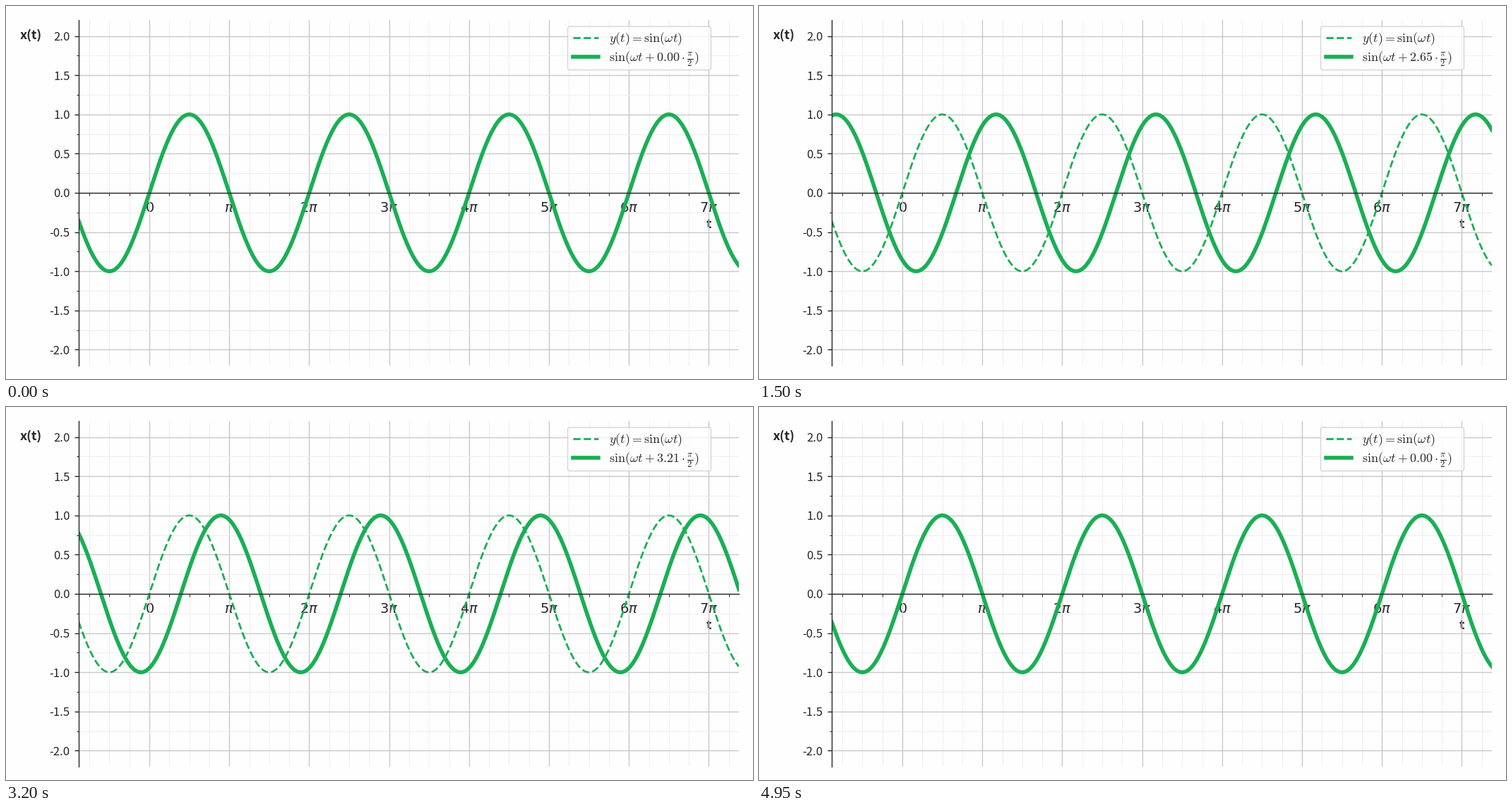
A matplotlib script for the animation above (5 s loop, 1058 by 529 pixels).

```python
import numpy as np
import matplotlib.pyplot as plt
from matplotlib.animation import FuncAnimation
from matplotlib.lines import Line2D
from matplotlib.patches import FancyBboxPatch
from matplotlib.ticker import MultipleLocator

W, H, DPI = 1058, 529, 72  # at 72 dpi one point is one pixel
FRAMES, INTERVAL = 100, 50
LEFT, RIGHT, TOP, BOTTOM = 103, 1038, 20.3, 509.7
X0, PX_PER_PI = 203, 113.2
BG, GREEN, DARK = "#fefefe", "#1aaf54", "#262626"
THIN, THICK = 2.78, 5.56

plt.rcParams["font.family"] = ["Noto Sans CJK JP", "DejaVu Sans"]
plt.rcParams["mathtext.fontset"] = "dejavusans"
plt.rcParams["axes.unicode_minus"] = False

fig = plt.figure(figsize=(W / DPI, H / DPI), dpi=DPI, facecolor=BG)
ax = fig.add_axes([LEFT / W, 1 - BOTTOM / H, (RIGHT - LEFT) / W, (BOTTOM - TOP) / H],
                  facecolor=BG)


def to_t(px):
    return (px - X0) / PX_PER_PI * np.pi


def to_px(x, y):
    """Stage pixels, y down, to display coordinates."""
    return x, H - y


def label(x, y, s, size, **kw):
    kw = {"ha": "center", "zorder": 1.5, "color": DARK} | kw
    return ax.text(*to_px(x, y), s, fontsize=size, va="baseline",
                   transform=None, **kw)


def setup_axes():
    ax.set_xlim(to_t(LEFT), to_t(RIGHT))
    ax.set_ylim(-2.2, 2.2)
    ax.xaxis.set_major_locator(MultipleLocator(np.pi))
    ax.xaxis.set_minor_locator(MultipleLocator(np.pi / 4))
    ax.yaxis.set_major_locator(MultipleLocator(0.5))
    ax.yaxis.set_minor_locator(MultipleLocator(0.25))
    ax.yaxis.set_major_formatter(lambda v, _: f"{v:.1f}")
    ax.grid(which="major", color="#c8c8c8", linewidth=1.4)
    ax.grid(which="minor", color="#eeeeee", linewidth=1)
    ax.tick_params(which="major", length=6, width=1.4, color=DARK,
                   labelcolor=DARK, labelsize=16.67, pad=6.3)
    ax.tick_params(which="minor", length=3.5, width=1, color=DARK)
    ax.tick_params(axis="x", labelbottom=False)
    ax.spines[["top", "right"]].set_visible(False)
    ax.spines["bottom"].set_position("zero")
    for side in ("left", "bottom"):
        ax.spines[side].set(color=DARK, linewidth=1.4)

    for k in range(8):
        text = "0" if k == 0 else rf"{k if k > 1 else ''}\pi"
        label(X0 + k * PX_PER_PI, 292, f"${text}$", 19.44)
    label(35, 47, "x(t)", 18, weight="bold")
    label(995.5, 315, "t", 18, weight="bold")


def setup_legend():
    ax.add_artist(FancyBboxPatch(
        to_px(795.5, 90.7), 203, 61.7, boxstyle="round,pad=0,rounding_size=3.6",
        transform=None, facecolor=BG, edgecolor="#cccccc", linewidth=1.39,
        alpha=0.8, zorder=5, clip_on=False))
    for y, style, lw in ((44.5, "--", THIN), (71.5, "-", THICK)):
        ax.add_artist(Line2D([803, 839.2], [H - y] * 2, color=GREEN, ls=style,
                             lw=lw, transform=None, zorder=6))
    kw = dict(ha="left", zorder=6, math_fontfamily="cm")
    label(853.5, 51, r"$y(t) = \sin(\omega t)$", 18.06, **kw)
    return label(853.5, 78, "", 18.06, **kw)


setup_axes()
formula = setup_legend()
t = np.linspace(to_t(LEFT), to_t(RIGHT), 1000)
ax.plot(t, np.sin(t), "--", color=GREEN, lw=THIN)
wave, = ax.plot(t, np.sin(t), color=GREEN, lw=THICK)


def update(i):
    # phase in quarter turns swings 0 -> 4 -> 0
    shift = 2 - 2 * np.cos(2 * np.pi * i / (FRAMES - 1))
    wave.set_ydata(np.sin(t + shift * np.pi / 2))
    formula.set_text(rf"$\sin(\omega t + {shift:.2f} \cdot \frac{{\pi}}{{2}})$")
    return wave, formula


anim = FuncAnimation(fig, update, frames=FRAMES, interval=INTERVAL,
                     repeat=True, repeat_delay=0)
plt.show()
```
